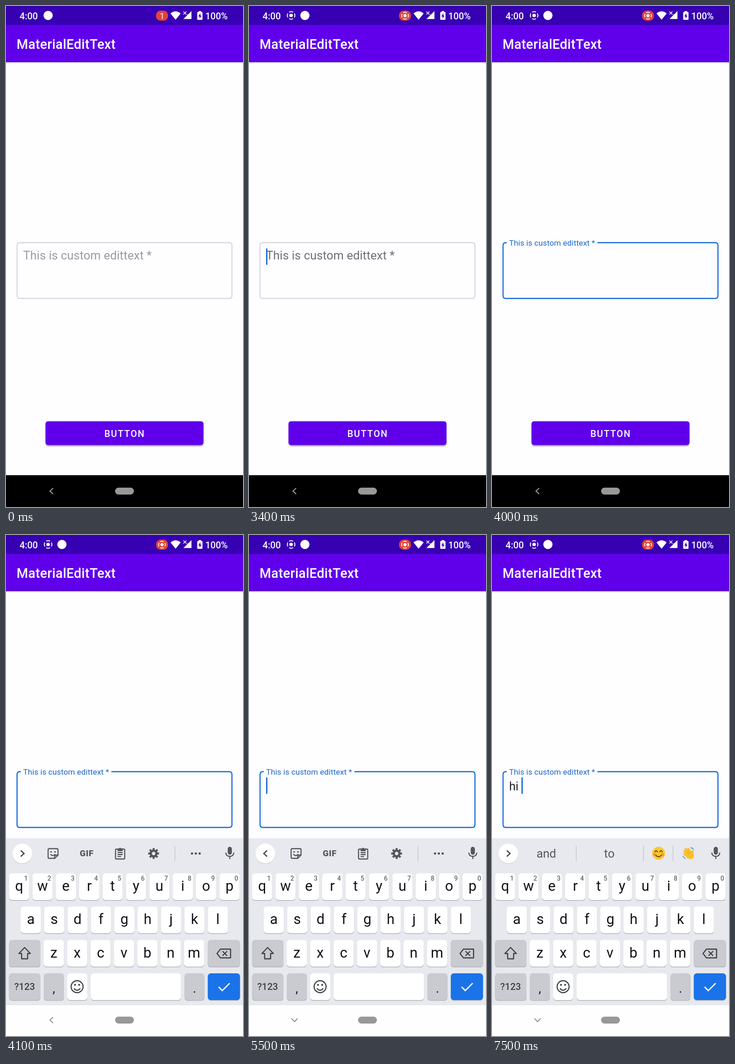
Recreate the animation shown at these times as an HTML page. Size 515 by 1087 pixels, loop 8000 ms.

```html
<!DOCTYPE html>
<html lang="en">
<head>
<meta charset="utf-8">
<title>MaterialEditText</title>
<style>
  html, body { margin: 0; width: 100%; height: 100%; overflow: hidden; background: #fefdff; }
  svg { display: block; font-family: Roboto, sans-serif; }
  .mid { text-anchor: middle; }
  .medium { font-weight: 500; }
  .line { fill: none; stroke-width: 2.4; }
  .icon { fill: none; stroke: #53565b; stroke-width: 2.4; }
  .solid { fill: #53565b; }
  .letter { font-size: 31px; fill: #121316; }
  .digit { font-size: 14px; font-weight: 500; fill: #63666b; }
  .word { font-size: 25.75px; fill: #55585d; }
</style>
</head>
<body>
<svg width="515" height="1087" viewBox="0 0 515 1087">
  <defs>
    <linearGradient id="shade" x2="0" y2="1">
      <stop stop-color="#8d86a0" stop-opacity=".55"/>
      <stop offset="1" stop-color="#8d86a0" stop-opacity="0"/>
    </linearGradient>
    <filter id="blur" x="-10%" y="-30%" width="120%" height="170%"><feGaussianBlur stdDeviation="1.6"/></filter>
    <g id="record">
      <circle r="3.8" fill="#fff"/>
      <circle r="8.2" fill="none" stroke="#fff" stroke-width="2" pathLength="4" stroke-dasharray=".7 .3" stroke-dashoffset=".35"/>
    </g>
    <path id="chevron" d="M-3.5-6.5 3.5 0-3.5 6.5" fill="none"/>
  </defs>

  <rect width="515" height="1087" fill="#fefdff"/>

  <rect y="121" width="515" height="4" fill="url(#shade)"/>
  <rect y="41" width="515" height="80.5" fill="#6000eb"/>
  <rect y="120.5" width="515" height="1.2" fill="#4b12a8"/>
  <rect width="515" height="41" fill="#3700b3"/>
  <text x="22.9" y="93" class="medium" font-size="28.6" letter-spacing=".36" fill="#fff">MaterialEditText</text>

  <g fill="#fff">
    <g class="medium" font-size="20">
      <text x="29.6" y="28.5">4:00</text>
      <text x="433" y="28.5">100%</text>
    </g>
    <circle id="appIcon" cy="20.5" r="10"/>
    <use id="recIcon" href="#record"/>
    <rect x="326" y="10" width="26" height="22" rx="10" fill="#e2433a"/>
    <text id="count" x="339" y="28" class="mid" font-size="19">1</text>
    <use id="recBadge" href="#record" transform="translate(339 21) scale(.9)"/>
    <path d="M357.5 16.2Q368.5 7 379.5 16.2L368.5 29.8Z"/>
    <path d="M403 11V28.3H385.5L393.5 20.4V18.5H395.5Z"/>
    <path d="M385.5 12 392 18.5M392 12 385.5 18.5" stroke="#fff" stroke-width="1.5"/>
    <path d="M418.5 13V11H424V13H425.5Q427 13 427 14.5V28.5Q427 30 425.5 30H417Q415.5 30 415.5 28.5V14.5Q415.5 13 417 13Z"/>
    <path d="M422.3 15.5 418 22.5H420.6V27.5L424.8 20.7H422.3Z" fill="#3700b3"/>
  </g>

  <path id="outline" class="line"/>
  <text id="hint" x="37.2" letter-spacing=".07"></text>
  <text id="typed" x="37.2" y="554" font-size="25.75" fill="#1f1f21" xml:space="preserve"></text>
  <rect id="underline" x="37.2" y="555.5" height="1.5" fill="#1f1f21"/>
  <rect id="cursor" y="526" width="2.8" height="35.5" fill="#1766d2"/>

  <rect x="86.5" y="904" width="342" height="51" rx="5.7" fill="#000" opacity=".38" filter="url(#blur)"/>
  <rect x="85.8" y="901" width="343.4" height="51.5" rx="5.5" fill="#6000eb"/>
  <text x="213.7" y="935" class="medium" font-size="20" letter-spacing="1.79" fill="#fff">BUTTON</text>

  <g id="keyboard">
    <rect y="658" width="515" height="362" fill="#e7e9ee"/>
    <circle cx="35.5" cy="692" r="21.8" fill="#cfd1d6"/>
    <circle cx="35.5" cy="691" r="21.5" fill="#fff"/>
    <use id="expand" href="#chevron" stroke="#45484d" stroke-width="2.7"/>
    <g class="solid">
      <rect x="481.8" y="676.5" width="9" height="17" rx="4.5"/>
      <path class="icon" d="M477.6 689Q478 697.3 486.3 697.3T495 689M486.3 697V703"/>
    </g>
    <g id="tools">
      <path class="icon" d="M94 680.5H110.5Q113 680.5 113 683V694.5L106 701.5H94Q91.5 701.5 91.5 699V683Q91.5 680.5 94 680.5ZM113 694.5H108.5Q106 694.5 106 697V701.5M96.5 692.5Q101.5 698.5 107 692.5"/>
      <circle class="solid" cx="98" cy="687.5" r="1.8"/>
      <circle class="solid" cx="106.5" cy="687.5" r="1.8"/>
      <text x="175.4" y="697" class="mid solid" font-size="18.5" font-weight="900" letter-spacing=".6">GIF</text>
      <path class="icon" d="M240 681.5H256Q258 681.5 258 683.5V701Q258 703 256 703H240Q238 703 238 701V683.5Q238 681.5 240 681.5ZM242.5 689H253.5M242.5 693.3H253.5M242.5 697.6H250"/>
      <path class="solid" d="M242.5 680.5H245Q248 676.5 251 680.5H253.5V686H242.5Z"/>
      <circle class="icon" cx="320.8" cy="691" r="6.2" style="stroke-width:5"/>
      <circle class="icon" cx="320.8" cy="691" r="9.8" style="stroke-width:4" pathLength="16" stroke-dasharray="1.1 .9" stroke-dashoffset=".55"/>
      <rect x="366.2" y="675" width="1.5" height="32" fill="#c3c6cb"/>
      <g class="solid"><circle cx="404.2" cy="691" r="2.5"/><circle cx="412.5" cy="691" r="2.5"/><circle cx="420.8" cy="691" r="2.5"/></g>
    </g>
    <g id="suggestions">
      <path d="M183 674V707.5M329 674V707.5" stroke="#c3c6cb" stroke-width="1.5"/>
      <g class="word mid">
        <text x="118" y="700"></text><text x="255" y="700"></text><text x="393" y="700"></text>
      </g>
      <g id="emoji">
        <path d="M393.5 674V707.5" stroke="#c3c6cb" stroke-width="1.5"/>
        <g transform="translate(362 690.5)">
          <circle r="14" fill="#fcc72d"/>
          <circle cx="-8.3" cy="3" r="3.4" fill="#f5973b"/><circle cx="8.3" cy="3" r="3.4" fill="#f5973b"/>
          <path d="M-8-3Q-5.3-8-2.6-3M2.6-3Q5.3-8 8-3M-6 4.5Q0 11 6 4.5" fill="none" stroke="#5f4018" stroke-width="2" stroke-linecap="round"/>
        </g>
        <g transform="translate(427 690.5)" fill="none" stroke="#fbc02d" stroke-width="4.4" stroke-linecap="round">
          <path d="M-9-5 1 6M-6.5-9.5 5 3M-.8-9.5 8 1M8 5 9-4.5M-9.5 1-1 9"/>
          <ellipse cx="4" cy="5" rx="6" ry="5" fill="#fbc02d" transform="rotate(42 4 5)"/>
          <path d="M-6-5 1 2M-2-6 4 0" stroke="#e59600" stroke-width="1"/>
          <path d="M5-12Q9-11.5 10.5-8.5M-12 6Q-10.5 10-7 11.5" stroke="#4c9fd8" stroke-width="1.8"/>
        </g>
      </g>
    </g>
    <g id="keys"></g>
    <g class="icon" style="stroke:#3c4043">
      <path d="M40.5 895 53 908H47V919.5H34V908H28Z" stroke-linejoin="round"/>
      <path d="M466 898.5H488V917.5H466L458.5 908ZM470.5 903 480.5 913M480.5 903 470.5 913" stroke-linejoin="round"/>
      <circle cx="154.5" cy="980" r="13"/>
      <path d="M147.5 983.5Q154.5 992 161.5 983.5"/>
      <path d="M462 980.5 470 988.5 486 972.5" stroke="#fff" style="stroke-width:2.8"/>
    </g>
    <g fill="#3c4043">
      <circle cx="150" cy="976" r="2.1"/><circle cx="159" cy="976" r="2.1"/>
      <text x="40.5" y="987" class="mid medium" font-size="20.5">?123</text>
      <g class="mid" font-size="27" fill="#121316"><text x="104" y="993">,</text><text x="409.5" y="993">.</text></g>
    </g>
  </g>

  <rect id="navBar" y="1018" width="515" height="69"/>
  <rect id="navEdge" y="1018.5" width="515" height="1.5" fill="#dcdee2"/>
  <use id="back" href="#chevron" stroke-width="2"/>
  <rect x="237" y="1045" width="41" height="15" rx="7.5" fill="#98989a"/>
</svg>
<script>
const LOOP = 8000;
const $ = id => document.getElementById(id);
const set = (id, attrs) => { for (const k in attrs) $(id).setAttribute(k, attrs[k]); };
const show = (id, on) => set(id, { display: on ? 'inline' : 'none' });
const within = (t, from, to) => t >= from && t < to;

function key(x, y, w, fill = '#fff') {
  const box = (dy, color) => `<rect x="${x}" y="${y + dy}" width="${w}" height="58" rx="6.5" fill="${color}"/>`;
  return box(1.6, '#b0b3b9') + box(0, fill);
}

function letterRow(letters, x0, y, numbered) {
  return [...letters].map((c, i) => {
    const x = x0 + i * 50.8;
    const digit = numbered ? `<text x="${x + 36.7}" y="${y + 15.5}" class="digit mid">${(i + 1) % 10}</text>` : '';
    return key(x, y, 43.8) + `<text x="${x + 21.9}" y="${y + 38.3}" class="letter mid">${c}</text>` + digit;
  }).join('');
}

const gray = '#c9cbd0';
$('keys').innerHTML =
  letterRow('qwertyuiop', 6.6, 734, true) + letterRow('asdfghjkl', 32, 806) + letterRow('zxcvbnm', 82, 878.5) +
  key(6.6, 878.5, 68.4, gray) + key(438.5, 878.5, 70, gray) +
  key(6.6, 951, 68.4, gray) + key(82, 951, 44, gray) + key(133, 951, 43.8) +
  key(184, 951, 196.5) + key(387.8, 951, 43.5, gray) + key(438.5, 951, 70, '#1a73e8');

const FRAME = 'V628.5Q491 634.5 485 634.5H30Q24 634.5 24 628.5V519.5Q24 513.5 30 513.5';
const outlinePath = floated =>
  `M${floated ? 229 : 30} 513.5H485Q491 513.5 491 519.5${FRAME}${floated ? 'H32' : 'Z'}`;

const cursorOn = [[3400, 3900], [4500, 5000], [5500, 6000], [6400, 7200], [7500, LOOP]];

function typedAt(t) {
  if (t < 6400) return ['', 0];
  if (t < 6700) return ['h', 14.2];
  if (t < 7500) return ['hi', 20.4];
  return ['hi ', 26.8];
}

function wordsAt(t) {
  if (t < 7000) return ['he', 'h', 'have'];
  if (t < 7500) return ['his', 'hi', 'him'];
  return ['and', 'to', ''];
}

function render(t) {
  const arrive = t < 200 ? 0 : t < 300 ? 0.5 : t < 500 ? 0.9 : 1;
  set('appIcon', { cx: 91.5 + 30 * arrive });
  set('recIcon', { transform: `translate(91.5 20.5) scale(${arrive})`, opacity: arrive });
  set('recBadge', { opacity: arrive });
  show('count', t < 200);

  const floated = t >= 3600;
  set('outline', { d: outlinePath(floated), stroke: floated ? '#126bd6' : '#dad8df' });
  set('hint', {
    y: floated ? 520 : 550,
    'font-size': floated ? 17.17 : 25.75,
    fill: floated ? '#1968c8' : t < 3400 ? '#9b9a9e' : '#706f73'
  });

  const [text, width] = typedAt(t);
  $('typed').textContent = text;
  set('cursor', { x: 37.2 + width });
  show('cursor', cursorOn.some(([a, b]) => within(t, a, b)));
  set('underline', { width: t < 7000 ? 14.2 : 20.4 });
  show('underline', within(t, 6600, 7500));

  const keyboard = t >= 4100, settled = t >= 4200, suggesting = t >= 6600;
  show('keyboard', keyboard);
  show('tools', !suggesting);
  show('suggestions', suggesting);
  show('emoji', t >= 7500);
  set('expand', { transform: `translate(35.7 691) rotate(${settled && !suggesting ? 180 : 0})` });
  const labels = document.querySelectorAll('.word text');
  wordsAt(t).forEach((word, i) => { labels[i].textContent = word; });

  set('navBar', { fill: keyboard ? '#fefefe' : '#000' });
  show('navEdge', keyboard);
  set('back', {
    transform: `translate(99 1052.5) rotate(${settled ? 90 : 180})`,
    stroke: keyboard ? '#8f9093' : '#a0a0a2'
  });
}

$('hint').textContent = 'This is custom edittext *';
const start = performance.now();
function tick() {
  render((performance.now() - start) % LOOP);
  requestAnimationFrame(tick);
}
tick();
</script>
</body>
</html>
```
